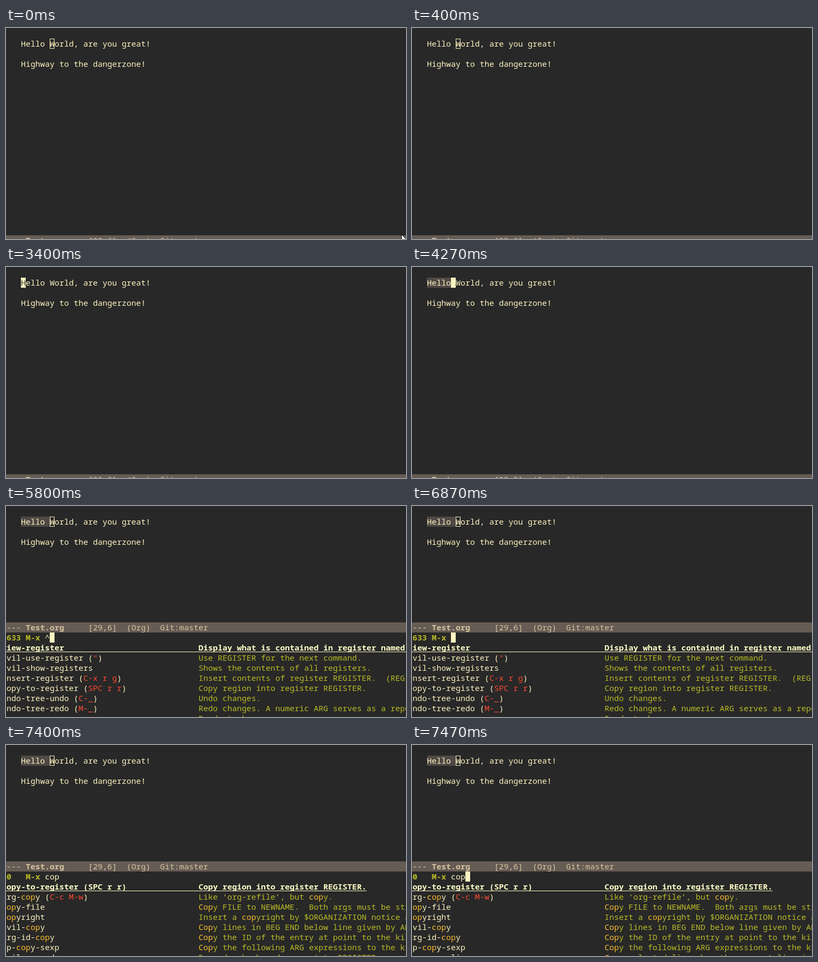
These frames come from a looping animation (750x397 px, 8 s). An HTML page with a canvas:

```html
<!DOCTYPE html>
<html lang="en">
<head>
<meta charset="utf-8">
<title>Editor session</title>
<style>
  html, body { margin: 0; width: 100%; height: 100%; overflow: hidden; background: #282828; }
  canvas { display: block; }
</style>
</head>
<body>
<canvas id="stage" width="750" height="397"></canvas>
<script>
const ctx = document.getElementById('stage').getContext('2d');
const LOOP = 8000, CELL = 9, LINE = 19, BASE = 15;
const LEFT = 28, TOP = 20;           // first cell of the buffer
const EDGE = -8, DOC = 361;          // minibuffer columns
const PROMPT_Y = 238;
const C = {
  bg: '#282828', fg: '#fdf4c1', bright: '#ffffc8', region: '#504945', bar: '#665c54',
  barText: '#d5c4a1', green: '#b8bb26', red: '#fb4934', match: '#fabd2f'
};

// Completion rows: [command, description, key binding]
const copyRegister = ['copy-to-register', 'Copy region into register REGISTER.', 'SPC r r'];
const allCommands = [
  ['view-register', 'Display what is contained in register named REGISTER.'],
  ['evil-use-register', 'Use REGISTER for the next command.', '"'],
  ['evil-show-registers', 'Shows the contents of all registers.'],
  ['insert-register', 'Insert contents of register REGISTER.  (REGISTER is', 'C-x r g'],
  copyRegister,
  ['undo-tree-undo', 'Undo changes.', 'C-_'],
  ['undo-tree-redo', 'Redo changes. A numeric ARG serves as a repeat count.', 'M-_'],
  ['', 'Read stuck.']
];
const matchC = [
  copyRegister,
  ['byte-compile-file', 'Compile a file of Lisp code named FILENAME into'],
  ['package-install', 'Install the package PKG.'],
  ['abf|my-recompile', ''],
  ['counsel-evil-registers', 'Ivy replacement for ‘evil-show-registers’.'],
  ['package-refresh-contents', 'Download descriptions of all configured ELPA packages.'],
  ['balance-windows', 'Balance the sizes of windows of WINDOW-OR-FRAME.', 'C-w ='],
  ['evil-record-macro', 'Record a keyboard macro into REGISTER.']
];
// The same list caught halfway through its repaint
const matchCPartial = [
  ...matchC.slice(0, 6), ['balance-windows', 'Balance the', 'C-w ='], allCommands[7]
];
const matchCop = [
  copyRegister,
  ['org-copy', 'Like ‘org-refile’, but copy.', 'C-c M-w'],
  ['copy-file', 'Copy FILE to NEWNAME.  Both args must be strings.'],
  ['copyright', 'Insert a copyright by $ORGANIZATION notice at cursor.'],
  ['evil-copy', 'Copy lines in BEG END below line given by ADDRESS.'],
  ['org-id-copy', 'Copy the ID of the entry at point to the kill ring.'],
  ['sp-copy-sexp', 'Copy the following ARG expressions to the kill ring.'],
  ['evc-copy-line', 'Copy selected line when the current line is empty.']
];
const matchCopPartial = [...matchCop.slice(0, 7), matchC[7]];

// Each state holds from its start time until the next one
const states = [
  { at: 0, col: 6, hollow: true },
  { at: 1130, col: 6 },
  { at: 2130, col: 0 },
  { at: 3400, col: 0, glyph: C.region },
  { at: 4270, col: 5, region: 5 },
  ...[
    { at: 5800, count: '5633', query: '^', rows: allCommands, caret: true },
    { at: 6870, count: '5633', query: '', rows: allCommands, caret: true },
    { at: 7070, count: '1459', query: 'c', rows: matchCPartial },
    { at: 7130, count: '1459', query: 'c', rows: matchC, caret: true },
    { at: 7400, count: '60', query: 'cop', rows: matchCopPartial },
    { at: 7470, count: '60', query: 'cop', rows: matchCop, caret: true }
  ].map(s => ({ ...s, col: 6, hollow: true, region: 6 }))
];

const pointerPath = [[741, 388], [703, 334], [658, 276], [629, 229], [646, 203], [702, 197]];
const POINTER_START = 70, POINTER_STEP = 66;

function rect(x, y, w, h, color) {
  ctx.fillStyle = color;
  ctx.fillRect(x, y, w, h);
}

// Draws one run in the row starting at y and returns the x after it
function text(str, x, y, color, bold) {
  ctx.font = (bold ? 'bold ' : '') + '15px "Noto Sans Mono", monospace';
  ctx.fillStyle = color;
  ctx.fillText(str, x, y + BASE);
  return x + str.length * CELL;
}

function highlighted(str, x, y, color, query) {
  const pieces = /^[a-z]+$/.test(query) ? str.split(new RegExp(`(${query})`, 'i')) : [str];
  pieces.forEach((piece, i) => { x = text(piece, x, y, i % 2 ? C.match : color); });
  return x;
}

function drawBuffer({ col, hollow, region = 0, glyph = C.bg }) {
  const line = 'Hello World, are you great!';
  const x = LEFT + col * CELL;
  rect(LEFT, TOP, region * CELL, LINE, C.region);
  text(line, LEFT, TOP, C.fg);
  text('Highway to the dangerzone!', LEFT, TOP + 2 * LINE, C.fg);
  if (hollow) {
    ctx.strokeStyle = C.fg;
    ctx.lineWidth = 1;
    ctx.strokeRect(x + .5, TOP + .5, CELL - 1, LINE - 1);
  } else {
    rect(x, TOP, CELL, LINE, C.fg);
    text(line[col], x, TOP, glyph);
  }
}

function drawModeLine(y, col) {
  rect(0, y, 750, LINE, C.bar);
  let x = text('---- ', EDGE, y, C.barText);
  x = text('Test.org', x, y, C.barText, true);
  text(`     [29,${col}]  (Org)  Git:master`, x, y, C.barText);
}

function drawSelected([name, doc, key], y) {
  text(name + (key ? ` (${key})` : ''), EDGE, y, C.bright, true);
  const end = text(doc, DOC, y, C.bright, true);
  rect(0, y + 17, end, 1, C.bright);
}

function drawRow([name, doc, key], y, query) {
  let x = highlighted(name, EDGE, y, C.fg, query);
  if (key) {
    x = text(' (', x, y, C.fg);
    x = highlighted(key, x, y, C.red, query);
    text(')', x, y, C.fg);
  }
  highlighted(doc, DOC, y, C.green, query);
}

function drawMinibuffer({ count, query, rows, caret }) {
  let x = text(count.padEnd(5) + 'M-x ', EDGE, PROMPT_Y, C.green, true);
  x = text(query, x, PROMPT_Y, C.fg);
  if (caret) rect(x, PROMPT_Y, CELL, LINE, C.fg);
  rows.forEach((row, i) => {
    const y = PROMPT_Y + (i + 1) * LINE;
    if (i) drawRow(row, y, query);
    else drawSelected(row, y);
  });
}

function drawPointer(t) {
  const step = t < POINTER_START ? 0 : 1 + Math.floor((t - POINTER_START) / POINTER_STEP);
  if (step >= pointerPath.length) return;
  ctx.save();
  ctx.translate(...pointerPath[step]);
  const arrow = new Path2D('M.5 .5V16.5L4.5 12.8L7 18.5L9.5 17.5L7 12H12Z');
  ctx.fillStyle = '#fff';
  ctx.strokeStyle = '#000';
  ctx.lineWidth = 1;
  ctx.fill(arrow);
  ctx.stroke(arrow);
  ctx.restore();
}

function draw() {
  const t = performance.now() % LOOP;
  const state = states.findLast(s => s.at <= t);
  rect(0, 0, 750, 397, C.bg);
  drawBuffer(state);
  drawModeLine(state.rows ? 219 : 390, state.col);
  if (state.rows) drawMinibuffer(state);
  drawPointer(t);
  requestAnimationFrame(draw);
}
draw();
</script>
</body>
</html>
```
